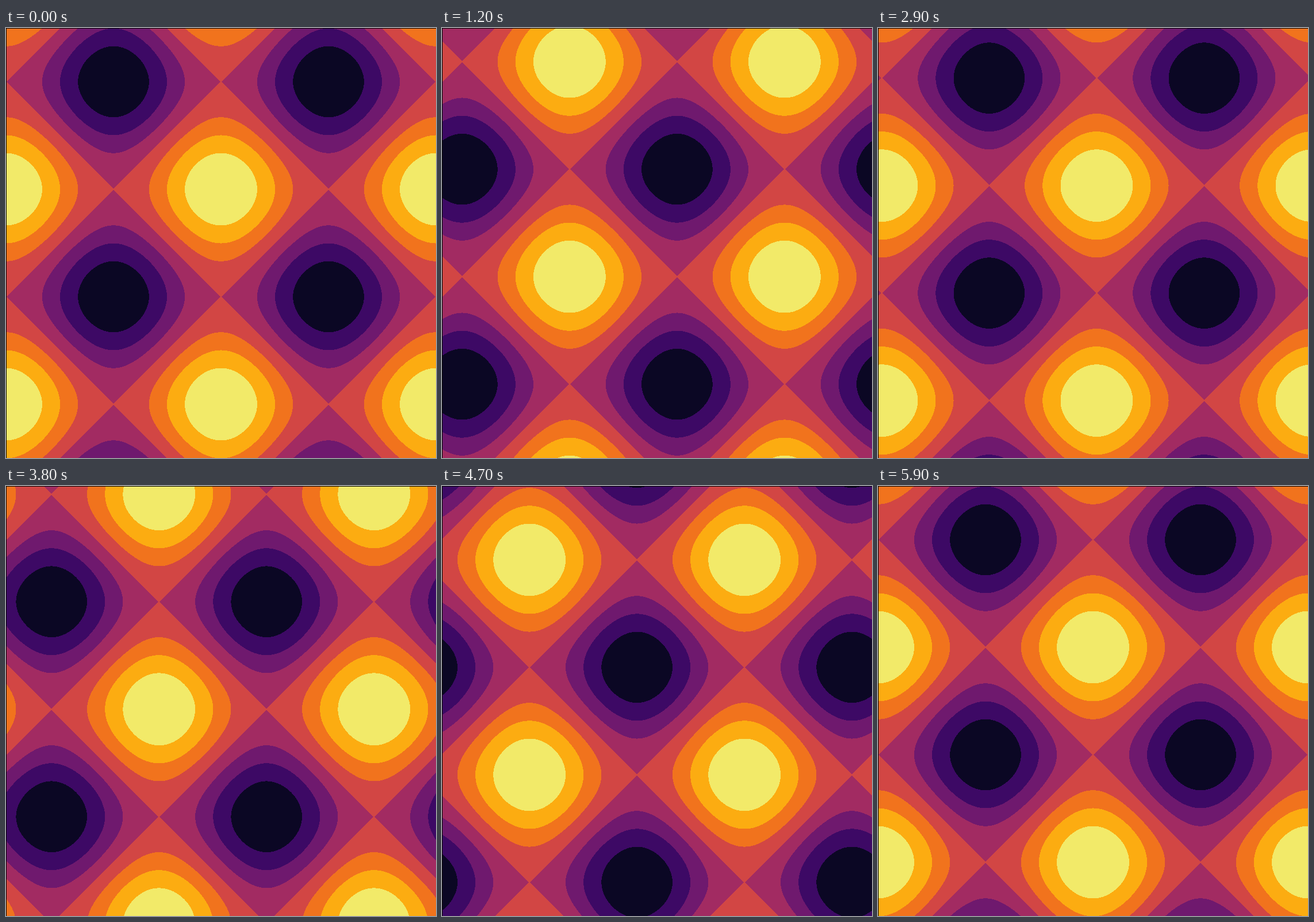
An HTML page with a canvas for the animation above (6000 ms loop, 748 by 748 pixels).

```html
<!DOCTYPE html>
<html lang="en">
<head>
<meta charset="utf-8">
<title>Drifting contours</title>
<style>
  html, body { margin: 0; width: 100%; height: 100%; overflow: hidden; background: #000; }
  canvas { display: block; }
</style>
</head>
<body>
<canvas id="stage" width="748" height="748"></canvas>
<script>
const SIZE = 748;
const PERIOD = SIZE / 2;
const STEP_MS = 100;
const STEPS = 60;
const COLORS = ['#0b0724', '#3d0965', '#6f196e', '#a22b62',
                '#d24644', '#f1731d', '#fcac11', '#f2ea69'];

const ctx = document.getElementById('stage').getContext('2d');
const image = ctx.createImageData(SIZE, SIZE);
const pixels = new Uint32Array(image.data.buffer);

// '#rrggbb' to an opaque little-endian ABGR word
const pack = hex => {
  const n = parseInt(hex.slice(1), 16);
  return (0xff000000 | (n & 255) << 16 | (n & 0xff00) | n >> 16) >>> 0;
};
const palette = COLORS.map(pack);
const black = pack('#000000');

// Highest value of a cosine wave inside each pixel, with a crest at `crest`
function wave(crest) {
  const at = p => Math.cos((p - crest) * 2 * Math.PI / PERIOD);
  return Float64Array.from({ length: SIZE }, (_, i) => Math.max(at(i), at(i + 1)));
}

function draw(step) {
  // The last step repeats the first one: two whole periods per loop
  const shift = 2 * PERIOD * step / (STEPS - 1);
  const across = wave(-shift);
  const down = wave(PERIOD * 0.75 + shift);
  for (let y = 0, i = 0; y < SIZE; y++) {
    for (let x = 0; x < SIZE; x++, i++) {
      const level = Math.floor((across[x] + down[y] + 2) * 2);
      pixels[i] = x && y ? palette[Math.max(0, Math.min(7, level))] : black;
    }
  }
  ctx.putImageData(image, 0, 0);
}

let shown = -1;
function tick() {
  const step = Math.floor(performance.now() / STEP_MS) % STEPS;
  if (step !== shown) draw(shown = step);
  requestAnimationFrame(tick);
}
tick();
</script>
</body>
</html>
```
